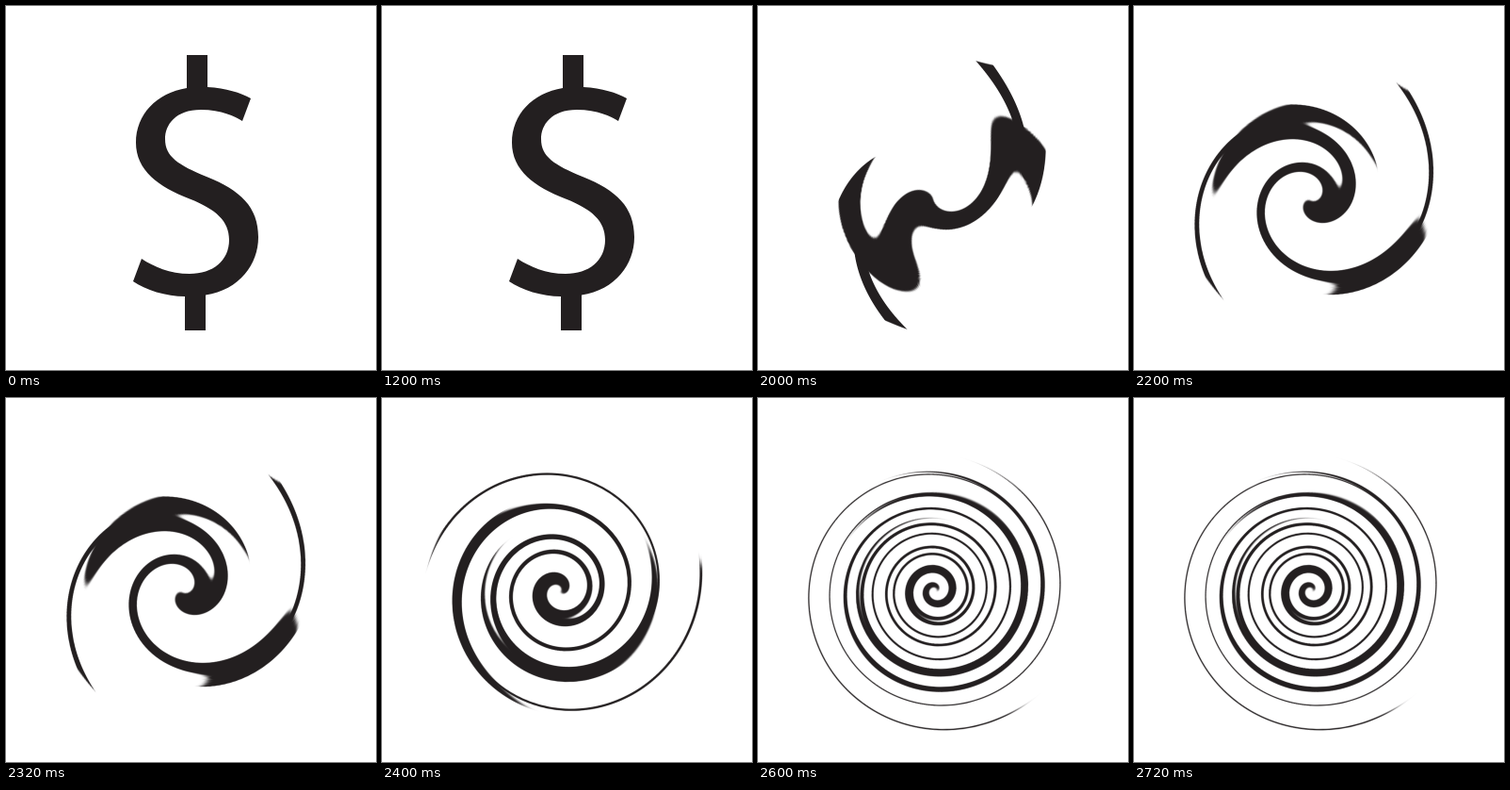
Recreate the animation shown at these times as an HTML page with a canvas. Size 393 px wide and 386 px high, loop 2800 ms.

```html
<!DOCTYPE html>
<html lang="en">
<head>
<meta charset="utf-8">
<title>Twirling dollar sign</title>
<style>
  html, body { margin: 0; width: 100%; height: 100%; overflow: hidden; background: #fff; }
  canvas { display: block; }
</style>
</head>
<body>
<canvas id="stage" width="393" height="386"></canvas>
<script>
  const LOOP = 2800, HOLD = 2000, STEP = 200;
  const CENTER = { x: 188.2, y: 204.2 }, RADIUS = 204;
  const TWISTS = [234, 313, 633, 1065]; // degrees added at the centre by each step
  const INK = '#231f20';
  const SIGN = new Path2D(`M192 52 H214 V86 C234 87 249 92 260 98 L251 122
    C243 117 229 110 207 110 C180 110 169 126 169 141
    C169 160 183 168.5 213 181 C249 195.5 268 213 268 245
    C268 274 248 301 212 306.5 V344 H190 V308
    C170 308 148 301 135 292 L144 268
    C157 276.5 174 284 195 284 C220 284 237 270 237 248
    C237 228 223 215.5 195 204.5 C162 192 138 174 138 145
    C138 115 160 92 192 87 Z`);

  const stage = document.getElementById('stage');
  const { width, height } = stage;
  const ctx = stage.getContext('2d', { willReadFrequently: true });

  function drawSign() {
    ctx.fillStyle = INK;
    ctx.fill(SIGN);
    const { data } = ctx.getImageData(0, 0, width, height);
    return Float32Array.from({ length: width * height }, (_, i) => data[i * 4 + 3]);
  }

  function sample(ink, x, y) {
    const left = Math.floor(x - 0.5), top = Math.floor(y - 0.5);
    if (left < 0 || top < 0 || left > width - 2 || top > height - 2) return 0;
    const u = x - 0.5 - left, v = y - 0.5 - top, i = top * width + left;
    return (ink[i] * (1 - u) + ink[i + 1] * u) * (1 - v)
      + (ink[i + width] * (1 - u) + ink[i + width + 1] * u) * v;
  }

  // Turn the picture clockwise, less and less towards the rim.
  function twirl(ink, degrees) {
    const turn = degrees * Math.PI / 180;
    const lookUp = (x, y) => {
      const dx = x - CENTER.x, dy = y - CENTER.y;
      const angle = turn * Math.max(0, 1 - Math.hypot(dx, dy) / RADIUS) ** 2;
      const cos = Math.cos(angle), sin = Math.sin(angle);
      return sample(ink, CENTER.x + dx * cos + dy * sin, CENTER.y + dy * cos - dx * sin);
    };
    return ink.map((_, i) => {
      const x = i % width, y = Math.floor(i / width);
      return (lookUp(x + 0.25, y + 0.25) + lookUp(x + 0.75, y + 0.25)
        + lookUp(x + 0.25, y + 0.75) + lookUp(x + 0.75, y + 0.75)) / 4;
    });
  }

  function toImage(ink) {
    const image = ctx.createImageData(width, height);
    const rgb = [1, 3, 5].map(i => parseInt(INK.slice(i, i + 2), 16));
    ink.forEach((alpha, i) => image.data.set([...rgb, Math.round(alpha)], i * 4));
    return image;
  }

  const inks = [drawSign()];
  for (const twist of TWISTS) inks.push(twirl(inks[inks.length - 1], twist));
  const poses = inks.map(toImage);
  let shown = 0;

  function draw(now) {
    const t = now % LOOP;
    const pose = t < HOLD ? 0 : 1 + Math.floor((t - HOLD) / STEP);
    if (pose !== shown) {
      ctx.putImageData(poses[pose], 0, 0);
      shown = pose;
    }
    requestAnimationFrame(draw);
  }
  draw(performance.now());
</script>
</body>
</html>
```
